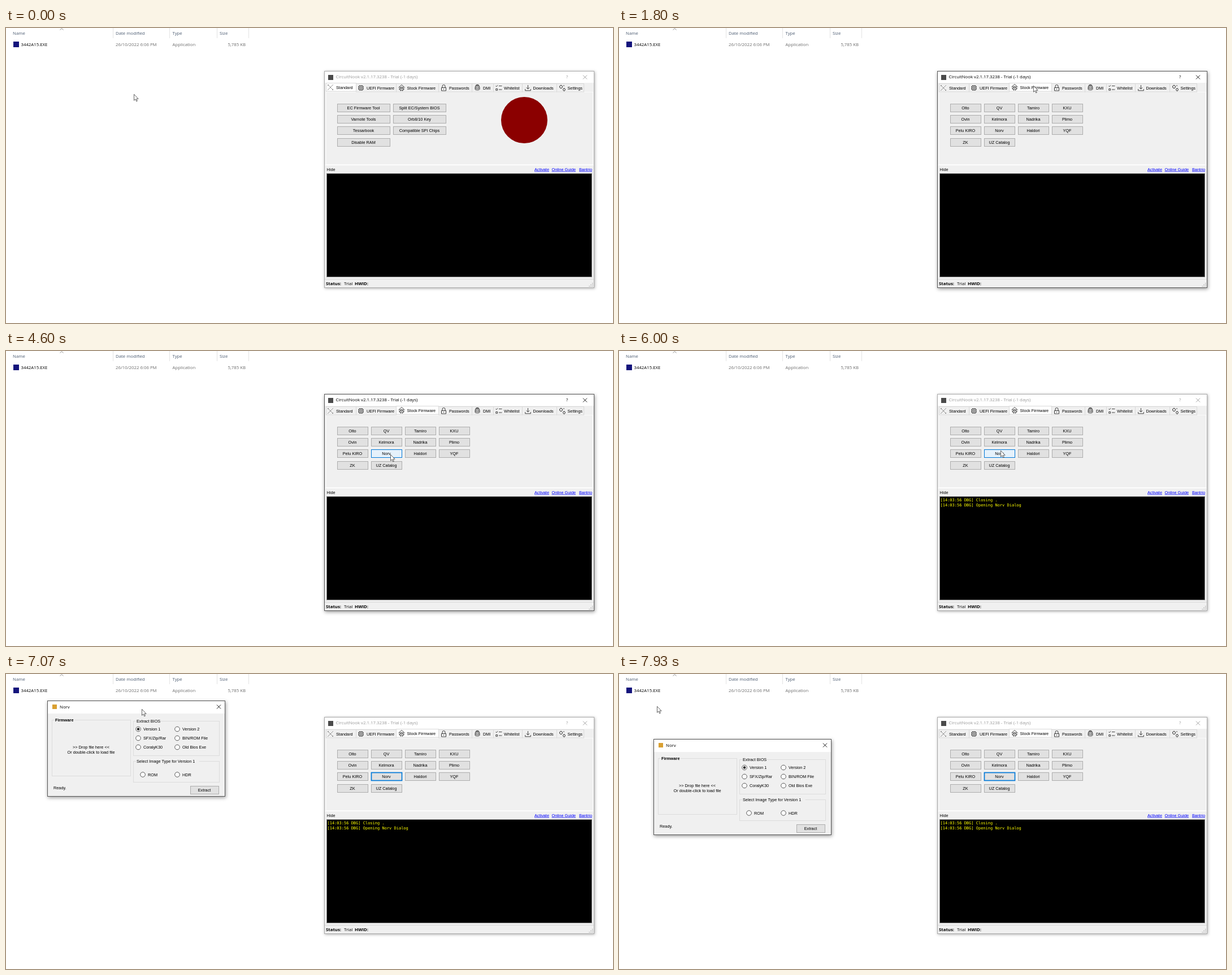
Animation, 1074 px wide and 522 px high, one loop 8 s. Source, as an HTML page:

```html
<!DOCTYPE html>
<html lang="en">
<head>
<meta charset="utf-8">
<title>Firmware tool</title>
<style>
  html, body { margin: 0; width: 100%; height: 100%; overflow: hidden; background: #fff; }
  svg { display: block; width: 100vw; height: 100vh; }
  text { white-space: pre; }
  .ui { font: 7.3px "Liberation Sans", Arial, sans-serif; }
  .sys { font: 7.8px "Open Sans", "Noto Sans", sans-serif; }
  .bold { font-weight: 700; }
  .log { font: 7px "DejaVu Sans Mono", monospace; fill: #ff0; }
  .mid { text-anchor: middle; }
  .end { text-anchor: end; }
  .link { fill: #00f; text-decoration: underline; }
  .icon { fill: none; stroke: #222; stroke-width: .85; }
  .tab:first-of-type .icon { stroke: #888; }
  .frame { fill: #f0f0f0; stroke: #555; filter: drop-shadow(1px 2px 3px rgba(0,0,0,.4)); }
  .glyph { fill: none; stroke: #000; stroke-width: .9; }
  .idle .frame { stroke: #aaa; filter: drop-shadow(1px 1px 2.5px rgba(0,0,0,.32)); }
  .idle .caption { fill: #999; }
  .idle .glyph { stroke: #999; }
  .tab rect { fill: #f0f0f0; stroke: #d9d9d9; }
  .tab.hover rect { fill: #d8eaf9; }
  .tab.on rect { fill: #fff; }
  .tab.on { transform: translateY(-1px); }
  .btn rect { fill: #e1e1e1; stroke: #adadad; }
  .btn.focus rect { stroke: #0078d7; stroke-width: 1.7; }
  .btn.hover rect { fill: #e5f1fb; stroke: #0078d7; stroke-width: 1; }
  .btn.press rect { fill: #cce4f7; stroke: #005499; stroke-width: 1; }
  .group { fill: none; stroke: #dcdcdc; }
  .radio { fill: #fff; stroke: #333; stroke-width: .8; }
</style>
</head>
<body>
<svg id="stage" viewBox="0 0 1074 522"></svg>
<script>
const LOOP = 8000, TICKS_PER_MS = 15 / 1000;
const BRAND = 'Norv';

// Text is placed by its vertical centre.
const text = (x, y, s, cls = 'ui', attrs = '') =>
  `<text x="${x}" y="${y + 2.6}" class="${cls}" ${attrs}>${s.replace(/</g, '&lt;').replace(/>/g, '&gt;')}</text>`;
const rect = (x, y, w, h, attrs = '') => `<rect x="${x}" y="${y}" width="${w}" height="${h}" ${attrs}/>`;
const path = (d, attrs = '') => `<path d="${d}" ${attrs}/>`;
const fill = c => `fill="${c}"`;
const button = (x, y, w, label) =>
  `<g class="btn" data-x="${x}" data-y="${y}" data-w="${w}" data-label="${label}">` +
  rect(x + .5, y + .5, w - 1, 14) + text(x + w / 2 - .5, y + 7.4, label, 'ui mid') + '</g>';
const cross = (x, y) => path(`M${x - 3.5} ${y - 3.5}l7 7m0-7l-7 7`, 'class="glyph"');

function explorer() {
  const head = fill('#4a5a70'), dim = fill('#6d6d6d');
  let out = [189.5, 289.5, 373.5, 429.5].map(x => path(`M${x} 0V18`, 'stroke="#e3e3e3"')).join('');
  out += path('M95.5 3.5L98.5 .8 101.5 3.5', 'fill="none" stroke="#777" stroke-width=".8"');
  [[12, 'Name'], [194, 'Date modified'], [294.5, 'Type'], [378, 'Size']]
    .forEach(([x, s]) => out += text(x, 9, s, 'sys', head));
  out += rect(13, 24, 10, 10, fill('#14147c'));
  out += text(26.5, 29, '3442A15.EXE', 'sys');
  out += text(194, 29, '26/10/2022 6:06 PM', 'sys', dim);
  out += text(294.5, 29, 'Application', 'sys', dim);
  return out + text(424, 29, '5,785 KB', 'sys end', dim);
}

const pins = 'M-1.5-5v1.5m3-1.5v1.5M-1.5 3.5V5m3-1.5V5M-5-1.5h1.5m-1.5 3h1.5M3.5-1.5H5m-1.5 3H5';
const TABS = [
  // left, right, icon x, label x, label, icon path
  [566, 619, 574, 584, 'Standard', 'M-5-5L5 5M5-5L-5 5M-5-3L-3-5M3 5L5 3'],
  [619, 690, 628, 638, 'UEFI Firmware', pins + 'M-3.5-3.5h7v7h-7zM-1.5-1.5h3v3h-3z'],
  [690, 765, 700, 709.5, 'Stock Firmware', 'M-5.5-.5L0-5.5 5.5-.5M-3-2V4H3V-2M-1.3-1.3h2.6v2.6h-2.6zM-5 2h2m6 0h2M-1.5 4v1.5m3-1.5v1.5'],
  [765, 824, 774.5, 784, 'Passwords', 'M-4-.5h8v5.5h-8zM-2.5-.5V-3a2.5 2.5 0 0 1 5 0V-.5M0 1.5V3'],
  [824, 862, 834, 844, 'DMI', 'M-4 3V-1a4 4 0 0 1 8 0V3M-2.3 4.5V-1a2.3 2.3 0 0 1 4.6 0V4.5M0-1.5V5M-3-4.5a4.5 4.5 0 0 1 6 0'],
  [862, 913, 872, 881, 'Whitelist', 'M-5.5-3.5l1.2 1.3 2.2-2.6M0-3.5H5.5M-5.2 1.5h2.8v2.8h-2.8zM0 3H5.5'],
  [913, 974, 923.5, 932.5, 'Downloads', 'M0-5V2M-2.8-.8L0 2 2.8-.8M-4.8 2V4.8H4.8V2'],
  [974, 1022, 984.5, 993.5, 'Settings', 'M-5-2a2.5 2.5 0 1 0 5 0a2.5 2.5 0 1 0-5 0M1 3a2 2 0 1 0 4 0a2 2 0 1 0-4 0M-2.5-5.2v1m0 4.4v1M-5.5-2h1m4 0h1M3 .2v1M3 5v1M1.5-4h2']
];

function grid(cols, pitch, w, labels) {
  return labels.map((s, i) =>
    button(586 + pitch * (i % cols), Math.round(134 + 20.2 * Math.floor(i / cols)), w, s)).join('');
}

function mainWindow() {
  let out = rect(563.5, 76.5, 477, 383, 'class="frame"') + rect(564, 77, 476, 20, fill('#fff'));
  out += rect(570, 83, 9, 9, fill('#4a4a4a'));
  out += text(583.5, 86.8, 'CircuitNook v2.1.17.3238 - Trial (-1 days)', 'sys caption');
  out += text(991, 86.8, '?', 'sys caption') + cross(1024.5, 87);
  out += rect(566.5, 113.5, 472, 128, 'fill="#f0f0f0" stroke="#fafafa"');
  out += '<g>';
  TABS.forEach(([l, r, ix, tx, label, d]) => {
    out += `<g class="tab">${rect(l + .5, 98.5, r - l, 14.5)}` +
      path(d, `class="icon" transform="translate(${ix} 106)"`) + text(tx, 106.4, label) + '</g>';
  });
  out += '</g><g id="standard">' + grid(2, 99, 94, ['EC Firmware Tool', 'Split EC/System BIOS', 'Varnote Tools',
    'Orb8/10 Key', 'Tessarbook', 'Compatible SPI Chips', 'Disable RAM']) +
    `<circle cx="917" cy="163" r="41" fill="#8b0000"/></g>`;
  out += '<g id="stock">' + grid(4, 60, 55, ['Olto', 'QV', 'Tamiro', 'KXU', 'Ovin', 'Kelmora', 'Nadrika',
    'Plimo', 'Pelu KIRO', BRAND, 'Haldori', 'YQF', 'ZK', 'UZ Catalog']) + '</g>';
  out += path('M564 242.5H1040', 'stroke="#fff"');
  out += text(567.5, 250, 'Hide') + text(935, 250, 'Activate', 'ui link') +
    text(965.5, 250, 'Online Guide', 'ui link') + text(1037, 250, 'Bantrio', 'ui link end');
  out += rect(567.5, 257.5, 469, 183, 'fill="#000" stroke="#8a8a8a"');
  out += '<g id="log">' + text(568.5, 263.8, '[14:03:56 DBG] Closing .', 'log') +
    text(568.5, 272.6, `[14:03:56 DBG] Opening ${BRAND} Dialog`, 'log') + '</g>';
  out += path('M564 444.5H1040', 'stroke="#dadada"');
  out += text(566, 452, 'Status:', 'sys bold') + text(598, 452, 'Trial', 'sys') + text(617, 452, 'HWID:', 'sys bold');
  for (let i = 0; i < 3; i++)
    for (let j = 0; j <= i; j++) out += rect(1037 - 2.7 * j, 451 + 2.7 * i, 1.3, 1.3, fill('#a5a5a5'));
  return out;
}

function groupBox(x, y, w, h, label, bold) {
  const size = label.length * (bold ? 4.4 : 3.6);
  return rect(x + .5, y + .5, w, h, 'class="group"') + rect(x + 5, y - 3, size, 7, fill('#f0f0f0')) +
    text(x + 6, y, label, bold ? 'ui bold' : 'ui');
}

const radio = (x, y, label, on) => `<circle cx="${x}" cy="${y}" r="4.3" class="radio"/>` +
  (on ? `<circle cx="${x}" cy="${y}" r="2.3" fill="#222"/>` : '') + text(x + 9, y + .2, label);

function dialog() {
  let out = rect(.5, .5, 314, 169, 'class="frame"') + rect(1, 1, 313, 22, fill('#fff'));
  out += rect(9, 7, 8, 8, fill('#d9a032')) + text(22, 11.2, BRAND, 'sys') + cross(303.5, 11);
  out += groupBox(8, 34, 139, 99, 'Firmware', true);
  out += text(77.5, 82, '>> Drop file here <<', 'ui mid') + text(77.5, 91, 'Or double-click to load file', 'ui mid');
  out += groupBox(152, 36, 152, 61, 'Extract BIOS');
  [['Version 1', 'Version 2'], ['SFX/Zip/Rar', 'BIN/ROM File'], ['CoralyK30', 'Old Bios Exe']].forEach((row, i) =>
    row.forEach((s, j) => out += radio(161 + 69 * j, 50.5 + 16 * i, s, i + j === 0)));
  out += groupBox(152, 107, 152, 37, 'Select Image Type for Version 1');
  out += radio(169, 131, 'ROM') + radio(230, 131, 'HDR');
  return out + text(11, 154.7, 'Ready.') + button(253, 151, 51, 'Extract');
}

const stage = document.getElementById('stage');
stage.innerHTML = rect(0, 0, 1074, 522, fill('#fff')) + explorer() +
  `<g id="main">${mainWindow()}</g><g id="dialog">${dialog()}</g>` +
  '<circle id="sonar" cx="680" cy="183" fill="none" stroke="#808080" stroke-opacity=".55" stroke-width="3"/>' +
  path('M.5.3V11.2L3 8.9 4.7 12.8 6.4 12.1 4.7 8.3H8.1Z', 'id="cursor" fill="#fff" stroke="#222" stroke-width=".7"');

const part = id => document.getElementById(id);
const [main, dlg, log, standard, stock, sonar, cursor] =
  ['main', 'dialog', 'log', 'standard', 'stock', 'sonar', 'cursor'].map(part);
const tabs = [...document.querySelectorAll('.tab')];
const buttons = [...stock.querySelectorAll('.btn')];

// Pointer path: tick, x, y
const PATH = [
  [0, 226, 117], [9, 226, 117], [11, 250, 100], [13, 345, 55], [15, 490, 22], [17, 620, 38],
  [19, 705, 82], [21, 733, 101], [22, 733, 102], [56, 733, 102], [57, 731, 105], [60, 704, 126],
  [62, 692, 148], [65, 682, 180], [66, 681, 187], [69, 680, 183], [87, 680, 183], [88, 680, 182],
  [90, 675, 176], [93, 560, 130], [96, 370, 78], [99, 265, 62], [101, 242, 61], [103, 242, 61],
  [105, 240, 57], [106, 240, 62], [108, 233, 101], [110, 228, 125], [112, 228, 125],
  [114, 205, 112], [117, 90, 66], [119, 49, 50]
];

function pointer(n) {
  const last = PATH.length - 1;
  let i = 0;
  while (i < last - 1 && PATH[i + 1][0] <= n) i++;
  const a = PATH[i], b = PATH[i + 1], span = b[0] - a[0], u = Math.min(1, (n - a[0]) / span);
  const slope = (k, c) => {
    const p = PATH[Math.max(0, k - 1)], q = PATH[Math.min(last, k + 1)];
    return (q[c] - p[c]) / (q[0] - p[0]) * span;
  };
  return [1, 2].map(c => {
    if (a[1] === b[1] && a[2] === b[2]) return a[c];
    const d = b[c] - a[c], s = slope(i, c), e = slope(i + 1, c);
    return Math.round(a[c] + u * (s + u * (3 * d - 2 * s - e + u * (s + e - 2 * d))));
  });
}

const show = (el, on) => el.style.display = on ? '' : 'none';
const place = (el, x, y) => el.setAttribute('transform', `translate(${x} ${y})`);

function draw(n) {
  const [x, y] = pointer(n), onStock = n >= 27, open = n >= 91;
  place(cursor, x, y);
  main.classList.toggle('idle', n < 26 || n >= 89);
  show(standard, !onStock);
  show(stock, onStock);
  show(log, n >= 89);

  tabs.forEach((el, i) => {
    const [l, r] = TABS[i];
    el.classList.toggle('on', i === (onStock ? 2 : 0));
    el.classList.toggle('hover', !open && x >= l && x < r && y >= 98 && y < 113);
  });
  buttons.forEach(el => {
    const bx = +el.dataset.x, by = +el.dataset.y, target = el.dataset.label === BRAND;
    const over = !open && x >= bx && x < bx + +el.dataset.w && y >= by && y < by + 15;
    el.classList.toggle('hover', over);
    el.classList.toggle('press', target && n === 87);
    el.classList.toggle('focus', target && n >= 87);
  });

  show(sonar, n >= 74 && n < 81);
  sonar.setAttribute('r', Math.max(0, 68 * (1 - (n - 74) / 7)));

  // The dragged dialog trails the pointer by one tick.
  show(dlg, open);
  const [gx, gy] = pointer(Math.min(110, Math.max(102, n - 1)));
  place(dlg, gx - 167, gy - 10);
}

const start = performance.now();
let shown = -1;
function loop() {
  const n = Math.floor(((performance.now() - start) % LOOP) * TICKS_PER_MS + 1e-6);
  if (n !== shown) draw(shown = n);
  requestAnimationFrame(loop);
}
loop();
</script>
</body>
</html>
```
